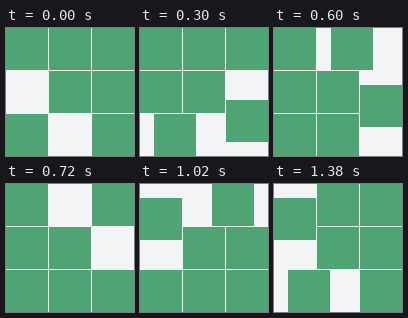
An HTML page for the animation above (1440 ms loop, 128 by 128 pixels).

```html
<!DOCTYPE html>
<html lang="en">
<head>
<meta charset="utf-8">
<title>Sliding tiles</title>
<style>
  html, body { margin: 0; width: 100%; height: 100%; overflow: hidden; background: #f3f4f6; }
  svg { display: block; width: 100vw; height: 100vh; }
</style>
</head>
<body>
<svg id="stage" viewBox="0 0 128 128" fill="#4ea573" shape-rendering="crispEdges"></svg>
<script>
  const SIZE = 42, PITCH = 43, TICK = 60, TICKS_PER_MOVE = 3, LOOP = 1440;
  // Outer cells in order; two gaps travel along this ring, two cells apart.
  const RING = [[0, 1], [0, 2], [1, 2], [2, 2], [2, 1], [2, 0], [1, 0], [0, 0]];
  const stage = document.getElementById('stage');

  function addTile(x, y) {
    const tile = document.createElementNS('http://www.w3.org/2000/svg', 'rect');
    tile.setAttribute('width', SIZE);
    tile.setAttribute('height', SIZE);
    place(tile, x, y);
    return stage.appendChild(tile);
  }

  function place(tile, x, y) {
    tile.setAttribute('x', Math.round(x * PITCH));
    tile.setAttribute('y', Math.round(y * PITCH));
  }

  const cell = i => RING[i % RING.length];

  addTile(1, 1);
  // Offsets from the trailing gap: 1 and 3 slide back one cell, the rest stay.
  const tiles = [1, 3, 4, 5, 6, 7].map(offset => ({
    offset, moving: offset < 4, node: addTile(...cell(offset))
  }));

  function render(time) {
    const tick = Math.floor((time % LOOP) / TICK);
    const step = Math.floor(tick / TICKS_PER_MOVE);
    const part = (tick % TICKS_PER_MOVE) / TICKS_PER_MOVE;
    for (const { offset, moving, node } of tiles) {
      const [x, y] = cell(step + offset);
      const [tx, ty] = moving ? cell(step + offset - 1) : [x, y];
      place(node, x + (tx - x) * part, y + (ty - y) * part);
    }
  }

  const start = performance.now();
  function loop() {
    render(performance.now() - start);
    requestAnimationFrame(loop);
  }
  loop();
</script>
</body>
</html>
```
